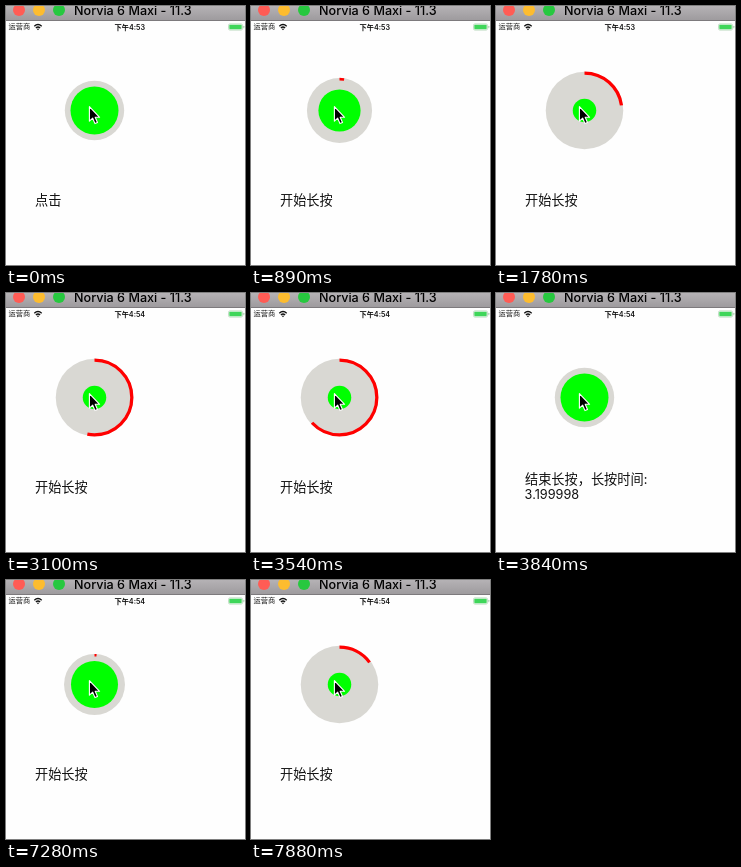
Animation, 239 px wide and 259 px high, one loop 8000 ms. Source, as an HTML page:

```html
<!DOCTYPE html>
<html lang="zh-CN">
<head>
<meta charset="utf-8">
<title>Long press button</title>
<style>
html, body { margin: 0; width: 100%; height: 100%; overflow: hidden; background: #fefefe; }
svg { display: block; width: 239px; height: 259px; }
.title { font: 500 12.6px Inter, sans-serif; fill: #000; }
.status { font: 7.2px Inter, "Noto Sans CJK SC", "Noto Sans CJK", sans-serif; fill: #111; }
.clock { font-weight: 600; }
.label { font: 13.2px "Noto Sans CJK SC", "Noto Sans CJK", sans-serif; fill: #111; }
.digits { font: 12.7px Inter, sans-serif; }
</style>
</head>
<body>
<svg viewBox="0 0 239 259">
  <defs>
    <linearGradient id="bar" x2="0" y2="1">
      <stop stop-color="#b5b2b5"/>
      <stop offset="1" stop-color="#9e9b9e"/>
    </linearGradient>
  </defs>
  <rect width="239" height="259" fill="#fefefe"/>

  <rect width="239" height="14" fill="url(#bar)"/>
  <rect y="14" width="239" height="1" fill="#7d7a7d"/>
  <circle cx="13" cy="4" r="6" fill="#ff5c55"/>
  <circle cx="33" cy="4" r="6" fill="#fdbc2f"/>
  <circle cx="53" cy="4" r="6" fill="#27c83f"/>
  <text class="title" x="68" y="9">Norvia 6 Maxi - 11.3</text>

  <text class="status" x="2.5" y="23.4">运营商</text>
  <g fill="none" stroke="#111" stroke-width="1.4">
    <path d="M28.3 20.2Q32 16.9 35.7 20.2M29.9 22Q32 20.2 34.1 22"/>
    <path d="M32 24.2L30.9 22.9Q32 22.1 33.1 22.9Z" fill="#111" stroke="none"/>
  </g>
  <text id="clock" class="status clock" x="123.8" y="23.5" text-anchor="middle"></text>
  <rect x="222.5" y="17.9" width="14" height="6.2" rx="1.5" fill="#fff" stroke="#a9cfae" stroke-width=".7"/>
  <rect x="223.3" y="18.7" width="12.4" height="4.6" rx=".8" fill="#3fd65a"/>
  <rect x="237.3" y="19.8" width="1" height="2.4" rx=".5" fill="#a9cfae"/>

  <g transform="translate(88.5 104.5)">
    <g id="ring">
      <circle r="29.7" fill="#d9d8d3"/>
      <circle id="arc" r="28.6" fill="none" stroke="#f00" stroke-width="2.5" pathLength="360" transform="rotate(-90)"/>
    </g>
    <circle id="dot" r="24" fill="#0f0"/>
  </g>

  <path d="M83.4 100.7V115.2L86.7 112.2L89 117.6L91.5 116.5L89.2 111.3H93.6Z" fill="#000" stroke="#fff" stroke-width="1.1" stroke-linejoin="round"/>

  <text id="one" class="label" x="29" y="198.6"></text>
  <g id="two" class="label">
    <text x="29" y="190.7">结束长按，长按时间:</text>
    <text class="digits" x="28.6" y="206">3.199998</text>
  </g>
</svg>
<script>
const LOOP = 8000, EASE = 275, LAG = 16, SPEED = 0.0826; // ms, ms, ms, degrees per ms
const RELEASE = 3545, RESET = 5940, MINUTE = 2520;
const PRESSES = [787, 7231];
const $ = id => document.getElementById(id);

// The picture refreshes in evenly spaced bursts: first, last, count.
const ticks = [0, RESET];
for (const [from, to, n] of [[890, 1930, 8], [2080, 3100, 8], [3240, 3840, 5], [7280, 7880, 5]])
  for (let i = 0; i < n; i++)
    ticks.push(Math.round((from + (to - from) * i / (n - 1)) / 10) * 10);
ticks.sort((a, b) => a - b);

function smooth(x) {
  x = Math.min(1, Math.max(0, x));
  return x * x * (3 - 2 * x);
}

function draw(t) {
  const start = t < RESET ? PRESSES[0] : PRESSES[1];
  const ended = t >= RELEASE && t < RESET;
  const pressed = t >= start && !ended;
  const grow = lag => ended
    ? 1 - smooth((t - RELEASE - lag) / EASE)
    : smooth((t - start - lag) / EASE);

  $('ring').setAttribute('transform', `scale(${1 + 0.305 * grow(0)})`);
  $('dot').setAttribute('transform', `scale(${1 - 0.51 * grow(LAG)})`);
  $('arc').style.display = pressed ? '' : 'none';
  $('arc').setAttribute('stroke-dasharray', `${Math.max(0, t - start) * SPEED} 360`);
  $('clock').textContent = t < MINUTE ? '下午4:53' : '下午4:54';
  $('one').textContent = ended ? '' : pressed ? '开始长按' : '点击';
  $('two').style.display = ended ? '' : 'none';
}

function frame() {
  const now = performance.now() % LOOP;
  draw(ticks.findLast(t => t <= now));
  requestAnimationFrame(frame);
}
frame();
</script>
</body>
</html>
```
